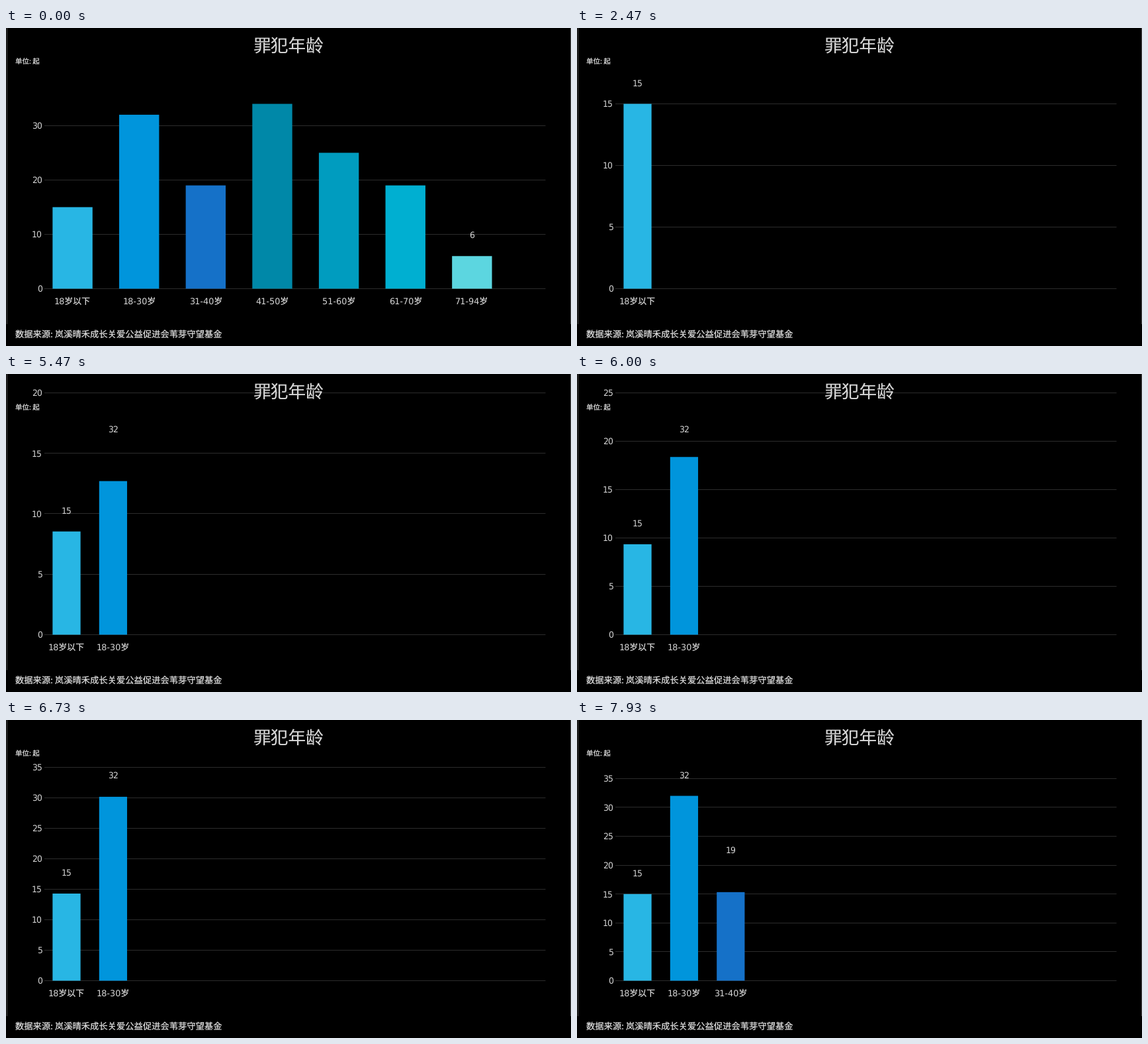
Recreate the animation shown at these times as a matplotlib script. Size 854x480 px, loop 8 s.

```python
import math

import matplotlib.pyplot as plt
from matplotlib.animation import FuncAnimation
from matplotlib.patches import Rectangle

W, H, DPI = 854, 480, 64
FRAMES, LOOP_MS = 400, 8000
TICKS_PER_SECOND = 15  # rate at which the chart itself updates
PT = 72 / DPI  # points per pixel

BASE_Y, PLOT_H, BAR_LEFT = 393.5, 279, 70.4
GROW_TICKS = 37.5  # 2.5 s per growing bar

AGES = ["18岁以下", "18-30岁", "31-40岁", "41-50岁", "51-60岁", "61-70岁", "71-94岁"]
COUNTS = [15, 32, 19, 34, 25, 19, 6]
COLORS = ["#28b6e4", "#0095dc", "#1571c8", "#0088a8", "#009cbf", "#00afd1", "#5cd6e0"]
INK, GRID, BORDER = "#d6d6d6", "#2c2c2c", "#444444"

plt.rcParams["text.hinting"] = "none"
LATIN_FIRST = ["DejaVu Sans", "Noto Sans CJK JP"]
CJK = ["Noto Sans CJK JP"]

fig = plt.figure(figsize=(W / DPI, H / DPI), dpi=DPI, facecolor="black")
ax = fig.add_axes([0, 0, 1, 1])
ax.set_xlim(0, W)
ax.set_ylim(H, 0)
ax.set_axis_off()
moving = []


def expo_out(t):
    if t <= 0:
        return 0.0
    return 1.0 if t >= 1 else 1 - 2 ** (-10 * t)


def cubic_in_out(t):
    t = min(max(t, 0), 1)
    return 4 * t ** 3 if t < 0.5 else 1 - 4 * (1 - t) ** 3


def mix(a, b, t):
    return a + (b - a) * t


def grown(tick, start):
    return expo_out((tick - start) / GROW_TICKS)


def label(x, baseline, text, size, family=LATIN_FIRST, ha="center"):
    return ax.text(x, baseline, text, fontsize=size * PT, family=family, color=INK,
                   ha=ha, va="baseline", zorder=4)


def hairline(xs, ys, color):
    return ax.plot(xs, ys, color=color, lw=PT, solid_capstyle="butt",
                   snap=False, zorder=1)[0]


def draw_axis(peak, step, top):
    for value in range(0, top + 1, step):
        y = BASE_Y - value * PLOT_H / peak
        if y < -8:
            break
        crisp = math.floor(y) + 0.5
        moving.append(hairline([58, 815.5], [crisp, crisp], GRID))
        moving.append(label(55, y + 4.6, str(value), 12.5, ha="right"))


def draw_bar(i, pitch, height, label_height=None):
    width = pitch * 0.6
    x = BAR_LEFT + i * pitch
    bar = Rectangle((x, BASE_Y - height), width, height, color=COLORS[i],
                    lw=0, snap=False, zorder=2)
    moving.append(ax.add_patch(bar))
    moving.append(label(x + width / 2, 416.7, AGES[i], 12.9))
    if label_height is not None:
        y = BASE_Y - label_height - 27
        moving.append(label(x + width / 2, y, str(COUNTS[i]), 12.5))


def draw_fixed_parts():
    for x in (1.5, W - 0.5):
        hairline([x, x], [0, 447], BORDER)
    label(427, 36, "罪犯年龄", 26.7, CJK)
    label(14, 54, "单位: 起", 10.5, CJK, "left")
    label(14, 467, "数据来源: 岚溪晴禾成长关爱公益促进会苇芽守望基金", 13.3, CJK, "left")


def draw_all_bars():
    draw_axis(34, 10, 30)
    for i, count in enumerate(COUNTS):
        height = count * PLOT_H / 34
        draw_bar(i, 100.63, height, height if i == 6 else None)


def draw_first(tick):
    draw_axis(15, 5, 15)
    draw_bar(0, 70.4, PLOT_H * grown(tick, -1.3), PLOT_H)


def draw_second(tick):
    # Bars tween in pixels while the axis rescales on its own, later curve.
    draw_axis(mix(15, 32, cubic_in_out((tick - 76.4) / 34.7)), 5, 35)
    e = grown(tick, 72.38)
    first = mix(PLOT_H, 15 * PLOT_H / 32, e)
    draw_bar(0, 70.4, first, first)
    draw_bar(1, 70.4, PLOT_H * e, PLOT_H)


def draw_third(tick):
    draw_axis(32, 5, 35)
    heights = [count * PLOT_H / 32 for count in COUNTS[:3]]
    for i in (0, 1):
        draw_bar(i, 70.4, heights[i], heights[i])
    e = grown(tick, 110.1) if tick > 111 else 0
    draw_bar(2, 70.4, heights[2] * e, heights[2])


def draw(frame):
    while moving:
        moving.pop().remove()
    # Sample late in the frame so that no update appears after its due time.
    ms = frame * LOOP_MS / FRAMES + 14
    tick = int(ms * TICKS_PER_SECOND / 1000)
    if tick < 1:
        draw_all_bars()
    elif tick < 73:
        draw_first(tick)
    elif tick < 111:
        draw_second(tick)
    else:
        draw_third(tick)
    return []


draw_fixed_parts()
anim = FuncAnimation(fig, draw, frames=FRAMES, interval=LOOP_MS / FRAMES,
                     repeat=True, repeat_delay=0)
plt.show()
```
